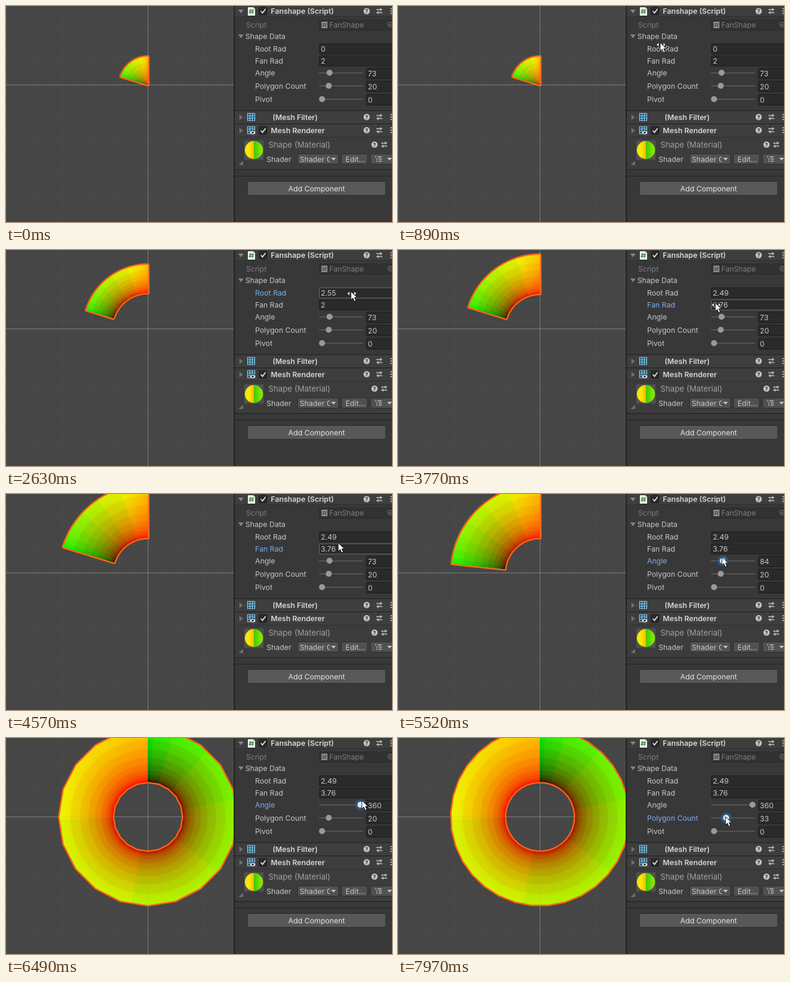
These frames come from a looping animation (640 by 360 pixels, 8 s). An HTML page with a canvas:

```html
<!DOCTYPE html>
<html lang="en">
<head>
<meta charset="utf-8">
<title>Fan shape inspector</title>
<style>
html, body { margin: 0; width: 100%; height: 100%; overflow: hidden; background: #464646; }
canvas, svg { position: absolute; left: 0; top: 0; width: 640px; height: 360px; }
text { font: 12.2px Inter, Roboto, sans-serif; fill: #c8c8c8; white-space: pre; }
.bold { font-weight: 600; fill: #d6d6d6; }
.dim { fill: #7c7c7c; }
.field { fill: #2a2a2a; stroke: #1c1c1c; }
.field.hot { stroke: #6a6a6a; }
.button { fill: #515151; stroke: #2c2c2c; }
</style>
</head>
<body>
<canvas id="scene" width="640" height="360"></canvas>
<svg id="panel" viewBox="0 0 640 360"></svg>
<script>
const LOOP = 8000, STEP = 87.5;
const CX = 235.5, CY = 131.5, UNIT = 23.5, GAMMA = 2.2;
const ctx = document.getElementById('scene').getContext('2d');
const panel = document.getElementById('panel');

// ---------- motion ----------
// Each key is [time, ...values]; values are interpolated linearly.
function track(keys, t) {
  if (t <= keys[0][0]) return keys[0].slice(1);
  for (let i = 1; i < keys.length; i++) {
    const a = keys[i - 1], b = keys[i];
    if (t <= b[0]) {
      const k = (t - a[0]) / (b[0] - a[0]);
      return a.slice(1).map((v, j) => v + (b[j + 1] - v) * k);
    }
  }
  return keys[keys.length - 1].slice(1);
}
const ROOT = [[1320, 0], [1410, .03], [1760, .15], [2190, 1.04], [2540, 2.4], [2630, 2.55], [2720, 2.49]];
const FAN = [[3330, 2], [3770, 2.76], [4210, 3.76]];
const ANGLE = [[5440, 73], [5520, 84], [5700, 120], [6050, 214], [6320, 310], [6480, 360]];
const COUNT = [[7610, 20], [7700, 24], [7960, 33]];
const MOUSE = [
  [350, 634, 231], [620, 520, 130], [880, 434, 61], [1150, 484, 69], [1320, 487, 69],
  [1760, 492, 69], [2190, 522, 69], [2630, 572, 69], [2720, 570, 69], [3060, 503, 88],
  [3330, 508, 88], [3770, 526, 88], [4210, 550, 88], [4460, 566, 76], [4800, 514, 95],
  [5090, 530, 105], [5350, 536, 105], [5520, 537, 105], [6050, 561, 105], [6480, 590, 104],
  [6740, 591, 104], [6960, 597, 100], [7480, 541, 131], [7700, 538, 131], [7960, 543, 131]
];
const between = (t, a, b) => t >= a && t < b;

// ---------- scene ----------
function line(x1, y1, x2, y2, color) {
  ctx.strokeStyle = color;
  ctx.beginPath();
  ctx.moveTo(x1, y1);
  ctx.lineTo(x2, y2);
  ctx.stroke();
}
function drawAxes(color) {
  ctx.lineWidth = 1;
  line(CX, 0, CX, 360, color);
  line(0, CY, 378, CY, color);
}
function drawGrid() {
  ctx.fillStyle = '#464646';
  ctx.fillRect(0, 0, 640, 360);
  ctx.lineWidth = 1;
  for (let i = -10; i < 11; i++) {
    const x = CX + i * UNIT, y = CY + i * UNIT;
    const color = i % 10 ? '#4b4b4b' : '#585858';
    line(x, 0, x, 360, color);
    line(0, y, 378, y, color);
  }
  drawAxes('#7a7a7a');
}
function fanPath(inner, outer, degrees, count) {
  const path = new Path2D();
  const point = (r, i) => {
    const a = degrees * Math.PI / 180 * i / count;
    return [CX - r * Math.sin(a), CY - r * Math.cos(a)];
  };
  path.moveTo(...point(outer, 0));
  for (let i = 1; i <= count; i++) path.lineTo(...point(outer, i));
  if (degrees >= 360) {
    path.closePath();
    path.moveTo(...point(inner, count));
  }
  for (let i = count; i >= 0; i--) path.lineTo(...point(inner, i));
  path.closePath();
  return path;
}
// Softly banded ramp, evenly spaced in display brightness.
function addBands(gradient, bands, span, color) {
  for (let i = 0; i < bands; i++) {
    const mid = (i + .5) / bands;
    for (const s of [i / bands, (i + 1) / bands]) {
      gradient.addColorStop(Math.min(1, s ** GAMMA * span), color(s + (mid - s) * .55));
    }
  }
  return gradient;
}
function drawFan(root, fan, degrees, count) {
  const inner = root * UNIT, outer = (root + fan) * UNIT;
  const path = fanPath(inner, outer, degrees, count);
  const span = degrees / 360, start = -Math.PI / 2 - span * 2 * Math.PI;
  ctx.save();
  ctx.lineJoin = 'round';
  ctx.lineWidth = 5;
  ctx.strokeStyle = '#fb6416';
  ctx.stroke(path);
  ctx.clip(path, 'evenodd');
  const paint = (mode, style) => {
    ctx.globalCompositeOperation = mode;
    ctx.fillStyle = style;
    ctx.fillRect(0, 0, 640, 360);
  };
  paint('source-over', addBands(ctx.createConicGradient(start, CX, CY), 8, span,
    s => `rgb(${Math.round(262 * s)},0,0)`));
  paint('lighter', addBands(ctx.createRadialGradient(CX, CY, inner, CX, CY, outer), 10, 1,
    s => `rgb(0,${Math.round(250 * s)},0)`));
  const warm = ctx.createConicGradient(start, CX, CY);
  warm.addColorStop(span * .78, '#fff');
  warm.addColorStop(span, 'rgb(255,208,255)');
  paint('multiply', warm);
  ctx.restore();
}

// ---------- inspector ----------
const text = (x, y, s, cls = '', extra = '') =>
  `<text x="${x}" y="${y + 4.5}" class="${cls}" ${extra}>${s}</text>`;
const rect = (x, y, w, h, attrs) => `<rect x="${x}" y="${y}" width="${w}" height="${h}" ${attrs}/>`;
const path = (d, attrs) => `<path d="${d}" ${attrs}/>`;
const rule = (y, color) => rect(379, y, 261, 1, `fill="${color}"`);
const field = (x, y, h, id = '') => rect(x + .5, y + .5, 140, h, `rx="2" class="field" id="${id}"`);
const button = (x, y, w, h) => rect(x + .5, y + .5, w, h, 'rx="2.5" class="button"');
const foldDown = y => path(`M385 ${y - 3}h9l-4.5 6z`, 'fill="#848484"');
const foldRight = y => path(`M387 ${y - 4.5}l6 4.5l-6 4.5z`, 'fill="#707070"');
const caret = (x, y) => path(`M${x - 4} ${y - 2}h8l-4 4.5z`, 'fill="#c4c4c4"');
const check = y => rect(419.5, y - 6.5, 13, 13, 'rx="2" class="field"') +
  path(`M422.5 ${y}l2.8 3l5-6.5`, 'fill="none" stroke="#e4e4e4" stroke-width="1.8"');
const help = (x, y) => `<circle cx="${x}" cy="${y}" r="5.2" fill="#c4c4c4"/>` +
  text(x, y - .7, '?', '', 'text-anchor="middle" style="font-size:9px;font-weight:700;fill:#3a3a3a"');
const sliders = (x, y) => path(
  `M${x - 5} ${y - 2.5}h10M${x - 5} ${y + 2.5}h10M${x + 2} ${y - 5}v5M${x - 2} ${y}v5`,
  'stroke="#c4c4c4" stroke-width="1.4" fill="none"');
const kebab = y => [-4, 0, 4].map(d => rect(637.5, y + d - 1, 2, 2, 'fill="#c4c4c4"')).join('');
const tools = y => help(598, y - .5) + sliders(619, y - .5) + kebab(y - .5);
const meshIcon = y => rect(400.5, y - 6, 12, 12, 'fill="#25506a" stroke="#8fd3f4"') +
  path(`M404.5 ${y - 6}v12M408.5 ${y - 6}v12M400.5 ${y - 2}h12M400.5 ${y + 2}h12`, 'stroke="#8fd3f4"');
const slider = (y, id) => rect(519, y - .5, 73, 1.5, 'fill="#5e5e5e"') +
  `<circle id="${id}Halo" cy="${y}" r="9" fill="#2a5784"/><circle id="${id}Thumb" cx="524" cy="${y}" r="5" fill="#999"/>`;
const numberRow = (label, y, id) => text(413, y, label, '', `id="${id}Label"`) +
  field(519, y - 9, 17, id + 'Field') + text(522, y, '', '', `id="${id}Value"`);
const sliderRow = (label, y, id) => text(413, y, label, '', `id="${id}Label"`) +
  slider(y - .5, id) + field(597, y - 9, 18, id + 'Field') + text(600, y + .7, '0', '', `id="${id}Value"`);

panel.innerHTML = `
<defs>
  <linearGradient id="ballLeft"><stop stop-color="#e4f000"/><stop offset=".5" stop-color="#ffe400"/><stop offset="1" stop-color="#ffb400"/></linearGradient>
  <linearGradient id="ballRight"><stop stop-color="#3cc800"/><stop offset="1" stop-color="#96f000"/></linearGradient>
  <clipPath id="menuClip"><rect x="484" y="246" width="53" height="20"/></clipPath>
</defs>` +
  rect(378, 0, 262, 360, 'fill="#383838"') + rect(377.5, 0, 2, 360, 'fill="#1f1f1f"') +
  rect(379.5, 0, 261, 17, 'fill="#3e3e3e"') + rect(379.5, 175, 261, 43, 'fill="#3e3e3e"') +
  rect(379.5, 219, 261, 53, 'fill="#3c3c3c"') +
  rule(17, '#303030') + rule(174, '#1e1e1e') + rule(196, '#1e1e1e') +
  rule(218, '#303030') + rule(272, '#1e1e1e') + rule(283, '#1e1e1e') +
  foldDown(9) + path('M401 2h9l3 3v11h-12z', 'fill="#eee"') +
  path('M405.5 5l-1 8M409.5 5l-1 8M403 7.5h8M402.5 10.5h8', 'stroke="#3c8c3c" stroke-width="1.3"') +
  check(8.5) + text(439, 8.5, 'Fanshape (Script)', 'bold') + tools(9) +
  text(398, 31.5, 'Script', 'dim') +
  rect(519.5, 23.5, 140, 17, 'rx="2" fill="#323232" stroke="#292929"') +
  rect(523, 26, 10, 11, 'rx="1" fill="#8a8a8a"') +
  path('M526.5 28l-.7 7M530.5 28l-.7 7M524.5 30h7.5M524 33h7.5', 'stroke="#40534a"') +
  text(536, 31.5, 'FanShape', 'dim') +
  '<circle cx="637" cy="31" r="4" fill="none" stroke="#777"/><circle cx="637" cy="31" r="1.5" fill="#777"/>' +
  foldDown(50.5) + text(397, 50.5, 'Shape Data') +
  numberRow('Root Rad', 71.5, 'root') + numberRow('Fan Rad', 91.5, 'fan') +
  sliderRow('Angle', 111.8, 'angle') + sliderRow('Polygon Count', 133.5, 'count') + sliderRow('Pivot', 155.7, 'pivot') +
  foldRight(185.5) + meshIcon(185) + text(442, 185.5, '(Mesh Filter)', 'bold') + tools(185.5) +
  foldRight(207.5) + meshIcon(207) +
  '<ellipse cx="409" cy="211" rx="5" ry="3.5" fill="#ddd" stroke="#3e3e3e"/><circle cx="409" cy="211" r="1.8" fill="#333"/>' +
  check(207.5) + text(439, 207.5, 'Mesh Renderer', 'bold') + tools(207.5) +
  rect(395, 224, 32, 32, 'fill="#525252"') +
  path('M411 225a15 15 0 0 0 0 30z', 'fill="url(#ballLeft)"') +
  path('M411 225a15 15 0 0 1 0 30z', 'fill="url(#ballRight)"') +
  text(435, 231.5, 'Shape (Material)', '', 'style="font-size:13.2px;fill:#a2a2a2"') +
  help(611, 231) + sliders(627, 231) +
  path('M393 258v7h-7z', 'fill="#707070"') +
  text(432, 255.5, 'Shader') + button(483, 246, 68, 17) +
  `<g clip-path="url(#menuClip)">${text(487, 255, 'Shader Graph')}</g>` + caret(543, 255) +
  button(556, 246, 43, 17) + text(563, 255, 'Edit...') +
  button(604, 246, 50, 17) +
  path('M612 251.5h2M616 251.5h7M614 255h2M618 255h5M614 258.5h2M618 258.5h5', 'stroke="#c4c4c4" stroke-width="1.3"') +
  caret(636, 255) +
  rect(400.5, 292.5, 229, 23, 'rx="3" fill="#585858" stroke="#2e2e2e"') +
  text(515, 304, 'Add Component', '', 'text-anchor="middle" style="fill:#e6e6e6"') +
  `<g id="mouse"><path id="arrows" d="M-6 3.5l4-4v8zM9 3.5l-4-4v8z" fill="#fff" stroke="#222" stroke-width=".9"/>
  <path d="M0 0v14l3.2-3l2.4 5.5l2.7-1.2l-2.4-5.3h4.4z" fill="#fff" stroke="#111" stroke-width="1"/></g>`;

const el = Object.fromEntries([...panel.querySelectorAll('[id]')].map(node => [node.id, node]));
const show = (node, on) => { node.style.display = on ? '' : 'none'; };

function moveThumb(id, x, active) {
  el[id + 'Thumb'].setAttribute('cx', x);
  el[id + 'Halo'].setAttribute('cx', x);
  el[id + 'Thumb'].setAttribute('fill', active ? '#e6e6e6' : '#999');
  show(el[id + 'Halo'], active);
}

function render(time) {
  const t = Math.floor(time % LOOP / STEP) * STEP + 9;
  const [root] = track(ROOT, t), [fan] = track(FAN, t);
  const degrees = Math.round(track(ANGLE, t)[0]), count = Math.round(track(COUNT, t)[0]);

  drawGrid();
  drawFan(root, fan, degrees, count);
  drawAxes('rgba(150,150,150,.16)');

  const focus = t < 1400 ? '' : t < 3400 ? 'root' : t < 5500 ? 'fan' : t < 7700 ? 'angle' : 'count';
  const values = { root: +root.toFixed(2), fan: +fan.toFixed(2), angle: degrees, count };
  for (const id in values) {
    el[id + 'Value'].textContent = values[id];
    el[id + 'Label'].style.fill = id === focus ? '#7cacf2' : '';
  }
  el.rootField.classList.toggle('hot', between(t, 970, 3000));
  el.fanField.classList.toggle('hot', between(t, 3000, 4900));
  moveThumb('angle', 523.4 + degrees / 360 * 64.4, focus === 'angle');
  moveThumb('count', 523.4 + (count - 3) * .69, focus === 'count');
  show(el.pivotHalo, false);

  const [x, y] = track(MOUSE, t);
  show(el.mouse, t > 355);
  show(el.arrows, between(t, 830, 4400));
  el.mouse.setAttribute('transform', `translate(${x} ${y})`);
}

const began = performance.now();
function tick() {
  render(performance.now() - began);
  requestAnimationFrame(tick);
}
tick();
</script>
</body>
</html>
```
